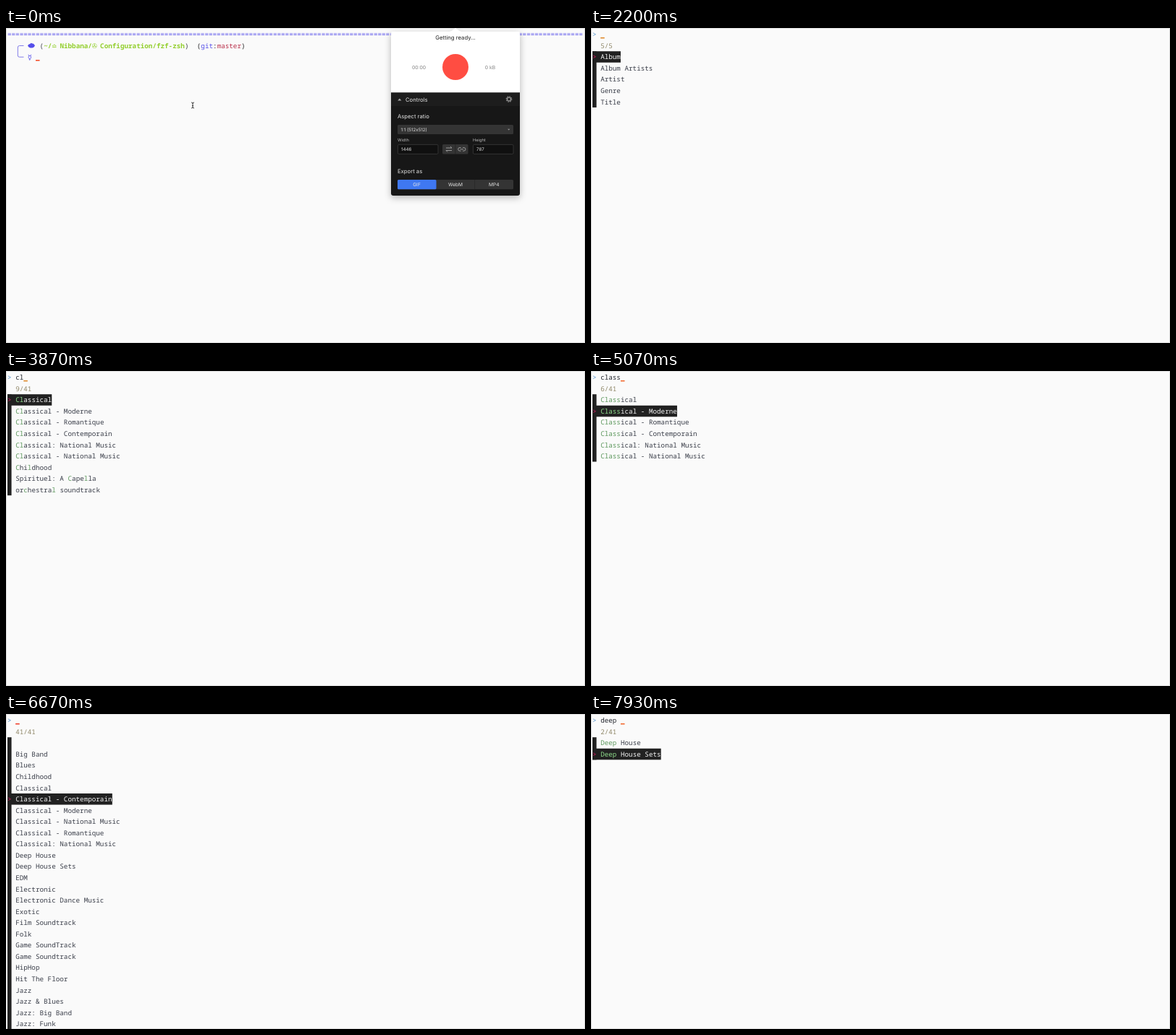
An HTML page that plays this animation: 800x436 px, repeating every 8000 ms.

```html
<!DOCTYPE html>
<html lang="en">
<head>
<meta charset="utf-8">
<title>Fuzzy finder session</title>
<style>
html, body { margin: 0; width: 100%; height: 100%; overflow: hidden; background: #fafafa; }
svg { display: block; width: 800px; height: 436px; }
text { white-space: pre; text-rendering: geometricPrecision; }
#term text { font: 500 9.283px "Noto Sans Mono", "DejaVu Sans Mono", monospace; }
#term .b { font-weight: 700; }
#term .sym { font: 10px "DejaVu Sans", sans-serif; }
#panel text { font: 7.7px Inter, "Open Sans", sans-serif; fill: #e4e4e4; }
#panel .s { font-size: 6.2px; }
#panel .xs { font-size: 5.7px; fill: #bbb; }
#panel .m { text-anchor: middle; }
</style>
</head>
<body>
<svg viewBox="0 0 800 436">
  <defs>
    <filter id="shade" x="-20%" y="-20%" width="140%" height="140%">
      <feDropShadow dx="0" dy="3" stdDeviation="5" flood-opacity=".28"/>
    </filter>
    <clipPath id="round"><rect x="532" y="5" width="178" height="227" rx="3"/></clipPath>
  </defs>
  <rect width="800" height="436" fill="#fafafa"/>
  <rect x=".5" y=".5" width="799" height="435" fill="none" stroke="#dedede"/>
  <g id="term"></g>
  <path id="mouse" d="M256 103q2 0 2 1.5q0-1.5 2-1.5M258 104v6M256 111q2 0 2-1.5q0 1.5 2 1.5M257 107.5h2" fill="none" stroke="#333" stroke-width=".9"/>
  <g id="panel">
    <g filter="url(#shade)">
      <path d="M611 5.5Q616 5 621 0Q626 5 631 5.5Z" fill="#fff"/>
      <rect x="532" y="5" width="178" height="227" rx="3" fill="#fff"/>
    </g>
    <g clip-path="url(#round)">
      <rect x="532" y="89.5" width="178" height="143" fill="#171717"/>
      <rect x="532" y="89.5" width="178" height="18.5" fill="#1d1d1d"/>
    </g>
    <text class="m" x="621" y="15.8" style="fill:#222">Getting ready...</text>
    <text class="m" x="570.5" y="56.8" style="fill:#858585;font-size:6.8px">00:00</text>
    <text class="m" x="669" y="56.8" style="fill:#858585;font-size:6.8px">0 kB</text>
    <circle cx="621" cy="54" r="18" fill="#ff4d42"/>
    <path d="M541.2 100.5l2.6-3 2.6 3z" fill="#aaa"/>
    <text x="552" y="101.8">Controls</text>
    <circle cx="695" cy="98.5" r="2.5" fill="none" stroke="#888" stroke-width="1.6"/>
    <circle cx="695" cy="98.5" r="3.8" fill="none" stroke="#888" stroke-width="1.2" stroke-dasharray="1.5 1.485"/>
    <text x="541" y="124.6">Aspect ratio</text>
    <rect x="541" y="134" width="160" height="13" rx="1.5" fill="#343434"/>
    <text class="s" x="545.5" y="142.8">1:1 (512x512)</text>
    <path d="M693 139.8h3.4l-1.7 1.8z" fill="#999"/>
    <text class="xs" x="541" y="157.2">Width</text>
    <text class="xs" x="645" y="157.2">Height</text>
    <g fill="#101010" stroke="#3c3c3c" stroke-width=".8">
      <rect x="541.4" y="161.4" width="55.6" height="13" rx="1.5"/>
      <rect x="645.4" y="161.4" width="55.6" height="13" rx="1.5"/>
    </g>
    <text class="s" x="546" y="170.4">1446</text>
    <text class="s" x="650" y="170.4">787</text>
    <rect x="603" y="161" width="35.5" height="13.5" rx="1.5" fill="#343434"/>
    <path d="M620.8 161v13.5" stroke="#242424" stroke-width=".8"/>
    <path d="M608 166h8l-2-2M616 169.5h-8l2 2M628.6 165.5h-1.6a2.3 2.3 0 0 0 0 4.6h1.6M631 165.5h1.6a2.3 2.3 0 0 1 0 4.6h-1.6M627.5 167.8h4.6" fill="none" stroke="#a5a5a5" stroke-width=".9"/>
    <text x="541" y="200.6">Export as</text>
    <rect x="541" y="210" width="160" height="13.3" rx="1.5" fill="#343434"/>
    <rect x="541" y="210" width="53.5" height="13.3" rx="1.5" fill="#3f78f2"/>
    <path d="M647.7 210v13.3" stroke="#282828" stroke-width=".7"/>
    <text class="m" x="567.5" y="219" style="font-size:6.6px">GIF</text>
    <text class="m" x="621" y="219" style="font-size:6.6px">WebM</text>
    <text class="m" x="674.3" y="219" style="font-size:6.6px">MP4</text>
  </g>
</svg>
<script>
const LOOP = 8000, COL = 5.57, ROW = 15.556, ROWS = 28;
const INK = '#3b3f4a', DARK = '#212121', VIOLET = '#554eea', LIME = '#93cf2e';

const TAGS = ['Album', 'Album Artists', 'Artist', 'Genre', 'Title'];
const GENRES = ['', 'Big Band', 'Blues', 'Childhood', 'Classical',
  ...['Contemporain', 'Moderne', 'National Music', 'Romantique'].map(s => 'Classical - ' + s),
  'Classical: National Music', 'Deep House', 'Deep House Sets', 'EDM', 'Electronic',
  'Electronic Dance Music', 'Exotic', 'Film Soundtrack', 'Folk', 'Game SoundTrack',
  'Game Soundtrack', 'HipHop', 'Hit The Floor', 'Jazz', 'Jazz & Blues', 'Jazz: Big Band',
  'Jazz: Funk', 'Jazz: Swing', 'Latin', 'Lounge', 'Metal', 'Opera', 'Pop', 'Punk', 'R&B',
  'Reggae', 'Rock', 'Soul', 'Spirituel: A Capella', 'Techno', 'World', 'orchestral soundtrack'];

// time, list (null = shell), query, selected index
const STEPS = [
  [0, null], [2070, TAGS, '', 0],
  [2870, TAGS, 'g', 0], [3000, TAGS, 'ge', 0], [3130, TAGS, 'gen', 0],
  [3470, GENRES, '', 0], [3730, GENRES, 'c', 0], [3800, GENRES, 'cl', 0],
  [4000, GENRES, 'cla', 0], [4130, GENRES, 'clas', 0], [4270, GENRES, 'class', 0],
  [4730, GENRES, 'class', 1], [5130, GENRES, 'class', 2], [5200, GENRES, 'class', 3],
  [5270, GENRES, 'class', 4], [5330, GENRES, 'class', 5],
  [5870, GENRES, 'clas', 5], [6200, GENRES, 'cla', 5], [6270, GENRES, 'cl', 5],
  [6330, GENRES, 'c', 5], [6400, GENRES, '', 5],
  [7130, GENRES, 'd', 5], [7400, GENRES, 'de', 5], [7600, GENRES, 'dee', 5],
  [7670, GENRES, 'deep', 5], [7800, GENRES, 'deep ', 5]
];
const CARET = [[0, '#f4512c'], [930, '#f9622f'], [2070, '#e08a2c'], [4600, '#f26a30'],
  [5870, '#f0402c'], [7130, '#f26a30']];

const term = document.getElementById('term');
const panel = document.getElementById('panel');
const mouse = document.getElementById('mouse');
const at = (table, t) => table.filter(s => s[0] <= t).pop();
const x = c => 2 + c * COL;
const y = r => 1.1 + r * ROW;

function add(tag, attrs, content) {
  const el = document.createElementNS('http://www.w3.org/2000/svg', tag);
  for (const k in attrs) el.setAttribute(k, attrs[k]);
  if (content) el.textContent = content;
  term.append(el);
}
const put = (c, r, str, fill, cls = '') =>
  add('text', { x: x(c), y: y(r) + 11.1, fill, class: cls }, str);
const box = (c, r, w, h, fill) =>
  add('rect', { x: x(c), y: y(r), width: w * COL, height: h * ROW, fill });
const caret = (c, r, fill) =>
  add('rect', { x: x(c), y: y(r) + 11.8, width: COL, height: 1.6, fill });

// Fuzzy match: first end found going forward, then the shortest span going back
function match(str, query) {
  const s = str.toLowerCase(), hits = [];
  let end = -1;
  for (const ch of query) {
    end = s.indexOf(ch, end + 1);
    if (end < 0) return null;
  }
  for (let i = end, q = query.length - 1; q >= 0; i--)
    if (s[i] === query[q]) { hits.unshift(i); q--; }
  const inner = hits[0] > 0 && /[a-z]/.test(s[hits[0] - 1]);
  return { str, hits, rank: (end - hits[0]) * 100 + (inner ? 50 : 0) };
}

function search(list, query) {
  if (!query) return list.map(str => ({ str, hits: [] }));
  return list.map(s => match(s, query)).filter(Boolean)
    .sort((a, b) => a.rank - b.rank || a.str.length - b.str.length);
}

function drawItem({ str, hits }, r, on) {
  if (on) {
    box(0, r, 2 + str.length, 1, DARK);
    put(0, r, '>', '#d7195f');
  }
  for (let i = 0; i < str.length;) {
    const hit = hits.includes(i);
    let j = i + 1;
    while (j < str.length && hits.includes(j) === hit) j++;
    put(2 + i, r, str.slice(i, j), hit ? (on ? '#8fdc8c' : '#5f995f') : (on ? '#f4f4f4' : INK));
    i = j;
  }
}

function drawFinder(list, query, sel, color) {
  const found = search(list, query.trim());
  const shown = found.slice(0, ROWS - 2);
  put(0, 0, '>', '#4d8fcb');
  put(2, 0, query, '#24272e');
  caret(2 + query.length, 0, color);
  put(2, 1, found.length + '/' + list.length, '#91896a');
  box(0, 2, 1, shown.length, DARK);
  shown.forEach((m, i) => drawItem(m, i + 2, i === Math.min(sel, shown.length - 1)));
}

function drawShell(color) {
  put(0, 0, '='.repeat(143), VIOLET);
  add('path', { d: 'M24.5 24.5H18.5Q16.3 24.5 16.3 27V38Q16.3 40.2 18.5 40.2H24.5',
    fill: 'none', stroke: '#817ce8', 'stroke-width': 1 });
  add('path', { d: 'M30 24.5L31.5 22.5 33 22.2 34.5 20.8 36.5 21.6 38 21.8 40 24.2 38.6 26.4 36.5 27.6 33.5 27.4 31.5 26.6Z',
    fill: VIOLET });
  put(8, 1, '(', INK);
  put(9, 1, '~/', LIME, 'b');
  add('path', { d: 'M64 26.3H69.5M64.2 24.4H65.3Q66.7 21.5 68.2 24.4H69.3',
    fill: 'none', stroke: LIME, 'stroke-width': 1 });
  put(13, 1, 'Nibbana/', LIME, 'b');
  add('text', { x: 118.6, y: 28, fill: LIME, class: 'sym' , style: 'font-size:9px' }, '✇');
  put(23, 1, 'Configuration/fzf-zsh', LIME, 'b');
  put(44, 1, ')', INK);
  put(47, 1, '(', DARK);
  put(48, 1, 'git', VIOLET);
  put(51, 1, ':', DARK);
  put(52, 1, 'master', '#b9304b');
  put(58, 1, ')', DARK);
  add('text', { x: 29.8, y: 43.6, fill: VIOLET, class: 'sym' }, '☿');
  caret(7, 2, color);
}

let last = '';
function render(t) {
  const step = at(STEPS, t), color = at(CARET, t)[1];
  const key = step[0] + color;
  if (key !== last) {
    last = key;
    term.replaceChildren();
    if (step[1]) drawFinder(step[1], step[2], step[3], color);
    else drawShell(color);
  }
  const fade = Math.max(0, Math.min(1, (400 - t) / 270));
  panel.setAttribute('opacity', fade);
  mouse.setAttribute('opacity', t < 600 ? 1 : 0);
}

const start = performance.now();
function tick() {
  render((performance.now() - start) % LOOP);
  requestAnimationFrame(tick);
}
tick();
</script>
</body>
</html>
```
